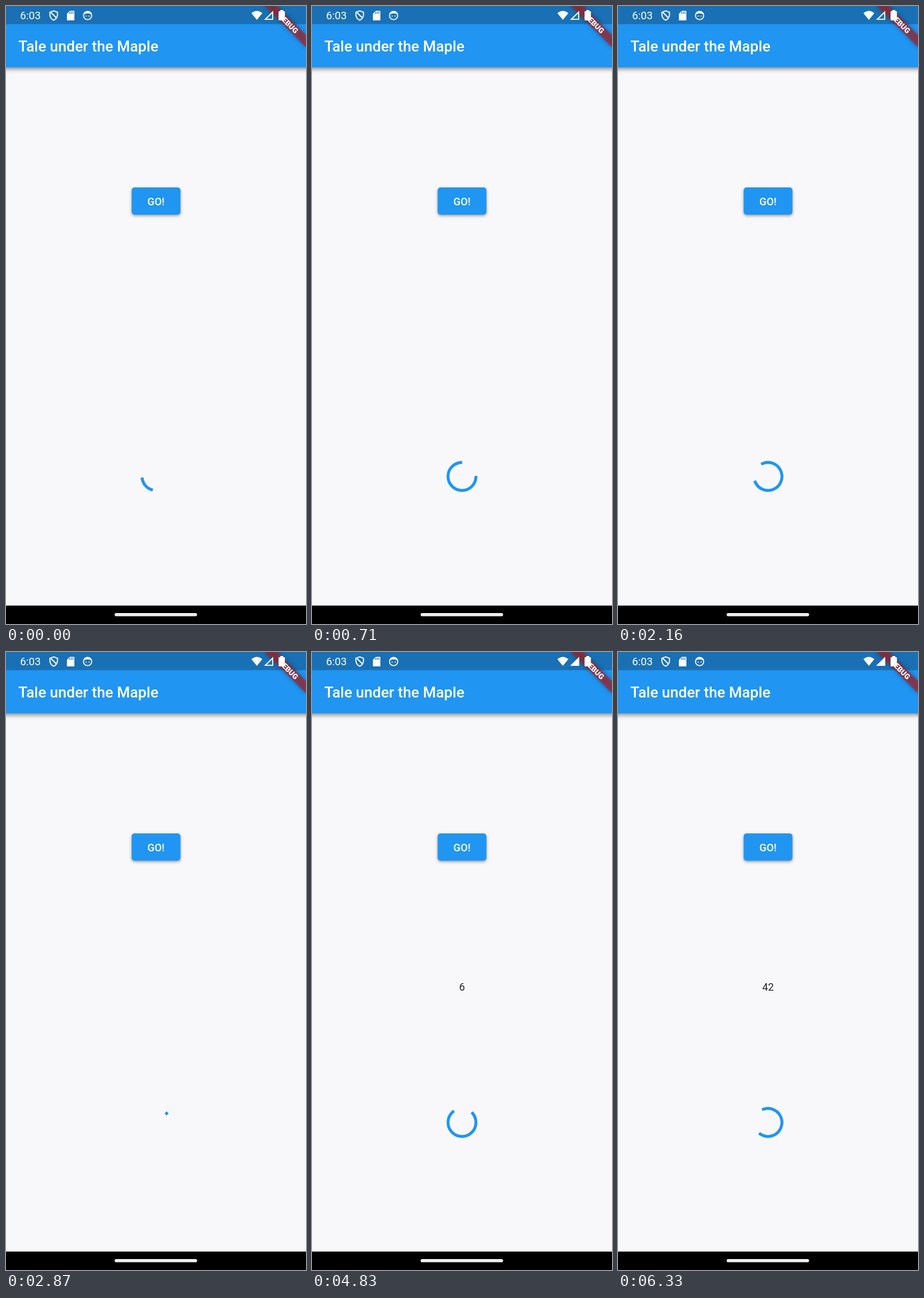
An HTML page with a canvas that plays this animation: 522x1073 px, repeating every 6.37 s.

```html
<!DOCTYPE html>
<html lang="en">
<head>
<meta charset="utf-8">
<title>Tale under the Maple</title>
<style>
  html, body { margin: 0; width: 100%; height: 100%; overflow: hidden; background: #f8f8fb; }
  canvas { display: block; }
</style>
</head>
<body>
<canvas id="stage" width="522" height="1073"></canvas>
<script>
const W = 522, H = 1073, LOOP = 6370;
const BLUE = '#2095f2';
const ctx = document.getElementById('stage').getContext('2d');
const rad = deg => deg * Math.PI / 180;
const clamp = x => Math.min(1, Math.max(0, x));
const ramp = (t, a, b) => clamp((t - a) / (b - a));
const mod = (a, n) => ((a % n) + n) % n;

// cubic-bezier(.4, 0, .2, 1)
function ease(x) {
  if (x <= 0 || x >= 1) return clamp(x);
  let lo = 0, hi = 1;
  for (let i = 0; i < 24; i++) {
    const s = (lo + hi) / 2, r = 1 - s;
    if (1.2 * s * r * r + 0.6 * s * s * r + s * s * s < x) lo = s; else hi = s;
  }
  return lo * lo * (3 - 2 * lo);
}

function shape(color, points) {
  ctx.fillStyle = color;
  ctx.beginPath();
  points.forEach(([x, y]) => ctx.lineTo(x, y));
  ctx.closePath();
  ctx.fill();
}

function box(color, x, y, w, h, r = 0) {
  ctx.fillStyle = color;
  ctx.beginPath();
  ctx.roundRect(x, y, w, h, r);
  ctx.fill();
}

function text(str, x, y, size, weight, color, align = 'center') {
  ctx.font = `${weight} ${size}px Roboto, sans-serif`;
  ctx.textAlign = align;
  ctx.fillStyle = color;
  ctx.fillText(str, x, y);
}

function shadow(alpha, blur, dy) {
  ctx.shadowColor = `rgba(0,0,0,${alpha})`;
  ctx.shadowBlur = blur;
  ctx.shadowOffsetY = dy;
}

function appBar() {
  ctx.save();
  shadow(0.42, 7, 3);
  box(BLUE, -10, 0, W + 20, 106.5);
  ctx.restore();
  box('#1a70b5', 0, 0, W, 31.5);
  text('Tale under the Maple', 21.5, 79, 26, 500, '#fff', 'left');
}

function banner() {
  ctx.save();
  ctx.translate(W, 0);
  ctx.rotate(Math.PI / 4);
  ctx.save();
  shadow(0.5, 8, 0);
  box('rgba(183,28,28,.63)', -50.8, 35.6, 101.6, 15.2);
  ctx.restore();
  text('DEBUG', 0, 47.8, 13, 900, '#fff');
  ctx.restore();
}

function shieldIcon() {
  ctx.strokeStyle = '#fff';
  ctx.lineWidth = 1.9;
  ctx.beginPath();
  ctx.moveTo(83, 8.4);
  ctx.lineTo(89.6, 10.8);
  ctx.lineTo(89.6, 15.5);
  ctx.quadraticCurveTo(89, 22, 83, 24.6);
  ctx.quadraticCurveTo(77, 22, 76.4, 15.5);
  ctx.lineTo(76.4, 10.8);
  ctx.closePath();
  ctx.moveTo(77.5, 10.5);
  ctx.lineTo(88, 21);
  ctx.stroke();
}

function cardIcon() {
  shape('#fff', [[111, 8.5], [118.5, 8.5], [119, 9.2], [119, 24.3], [118.4, 25], [106.6, 25], [106, 24.3], [106, 13.5]]);
  for (const x of [110, 112.9, 115.8]) box('#1a70b5', x, 10.2, 1.4, 3.4);
}

function faceIcon() {
  ctx.strokeStyle = '#fff';
  ctx.lineWidth = 1.7;
  ctx.beginPath();
  ctx.arc(142, 16.5, 7.2, 0, 7);
  ctx.stroke();
  ctx.fillStyle = '#fff';
  ctx.beginPath();
  ctx.arc(142, 16.5, 7.2, rad(190), rad(350));
  ctx.quadraticCurveTo(142, 10.5, 134.9, 15.2);
  ctx.fill();
  for (const x of [139.4, 144.6]) {
    ctx.beginPath();
    ctx.arc(x, 17.5, 1, 0, 7);
    ctx.fill();
  }
}

function wifiIcon() {
  ctx.fillStyle = '#fff';
  ctx.beginPath();
  ctx.moveTo(436.5, 24);
  ctx.lineTo(427, 12.4);
  ctx.quadraticCurveTo(436.5, 4.6, 446, 12.4);
  ctx.closePath();
  ctx.fill();
}

function signalIcon(full) {
  shape('#fff', [[465, 8.3], [465, 24], [449, 24]]);
  if (!full) shape('#1a70b5', [[463.2, 12.7], [463.2, 22.2], [453.5, 22.2]]);
}

function batteryIcon() {
  box('#fff', 474.3, 9, 11, 16, 1.3);
  box('#fff', 477.2, 7, 5.2, 3);
}

function button(t) {
  ctx.save();
  shadow(0.4, 5, 2);
  box(BLUE, 218.7, 315, 84.8, 47.3, 5);
  ctx.restore();
  const glow = 0.16 * ramp(t, 1420, 1460) * (1 - ramp(t, 1580, 1800));
  if (glow > 0) box(`rgba(255,255,255,${glow})`, 218.7, 315, 84.8, 47.3, 5);
  text('GO!', 261, 345.6, 18.2, 500, '#fff');
}

// The spinner stalls briefly when the recording starts and when the button is hit.
function spinTime(t) {
  if (t < 40) return -135;
  return t >= 1185 && t < 1480 ? 1185 : t;
}

function spinner(t) {
  const u = mod(t - 198, 1333) / 1333;
  const head = ease(u * 2), tail = ease(u * 2 - 1);
  const start = 214 + 360 * t / 2222 + 90 * u + 270 * tail;
  const sweep = Math.max(270 * (head - tail), 0.06);
  ctx.strokeStyle = BLUE;
  ctx.lineWidth = 5.1;
  ctx.lineCap = 'square';
  ctx.beginPath();
  ctx.arc(261, 816.8, 24.3, rad(start), rad(start + sweep));
  ctx.stroke();
  ctx.lineCap = 'butt';
}

function result(t) {
  if (t < 4250) return;
  text(t < 6250 ? '6' : '42', 261, 588, 18, 400, '#222');
}

function draw(t) {
  box('#f8f8fb', 0, 0, W, H);
  appBar();
  button(t);
  result(t);
  spinner(spinTime(t));
  banner();
  text('6:03', 24.5, 23.2, 18.6, 400, '#fff', 'left');
  shieldIcon();
  cardIcon();
  faceIcon();
  wifiIcon();
  signalIcon(t >= 4200);
  batteryIcon();
  box('#000', 0, 1041, W, 32);
  box('#f1eff0', 189, 1054, 143.5, 5.6, 2.8);
}

const begin = performance.now();
function tick() {
  draw((performance.now() - begin) % LOOP);
  requestAnimationFrame(tick);
}
tick();
</script>
</body>
</html>
```
